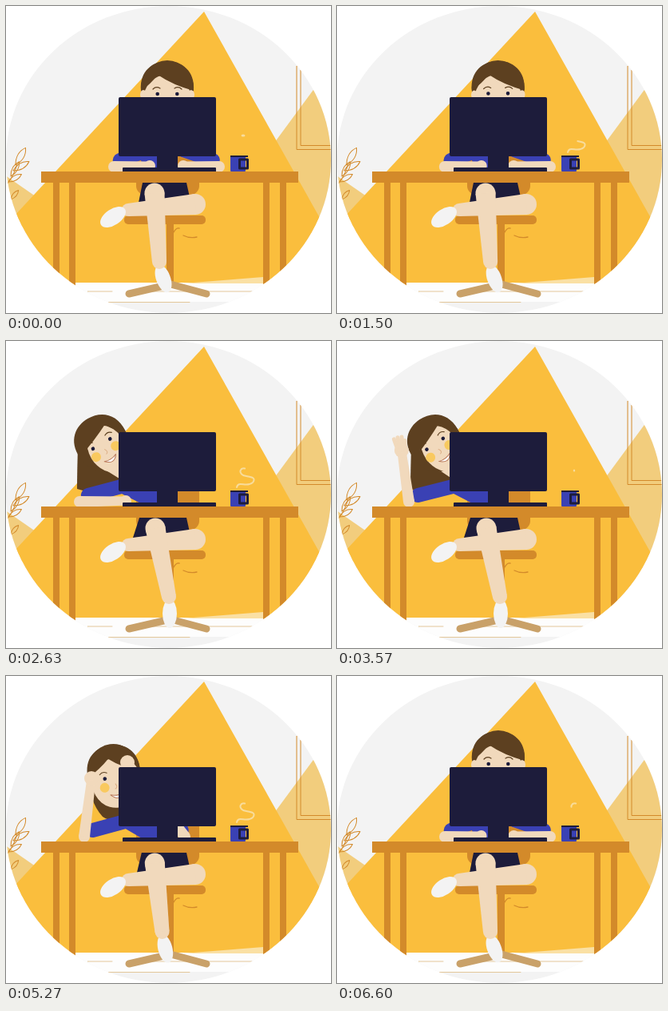
Animation of 407 by 384 pixels, one loop 6630 ms. Source, as an HTML page with a canvas:

```html
<!DOCTYPE html>
<html lang="en">
<head>
<meta charset="utf-8">
<title>At the desk</title>
<style>
html, body { margin: 0; width: 100%; height: 100%; overflow: hidden; background: #fff; }
canvas { display: block; }
</style>
</head>
<body>
<canvas id="stage" width="407" height="384"></canvas>
<script>
const c = document.getElementById('stage').getContext('2d');
const LOOP = 6630, STEAM = LOOP / 2;
const NAVY = '#1d1c3b', BLUE = '#3a41b4', SKIN = '#f1d9bc', HAIR = '#5d4020',
      GOLD = '#fabe3d', WOOD = '#d38a2a', PALE = '#f2cd7d', WALL = '#f3f3f3',
      RULE = '#e3c79a', STEAM_COLOR = '#f8dc9b';

// Each pose gives the head, the elbows on the desk and the hands.
const typing = { x: 202, y: 103, tilt: 0, lift: 0, open: 0,
  elbow: 135, handX: 180, handY: 200, elbowR: 267, handRX: 222, handRY: 200 };
const lookUp = { ...typing, x: 198, y: 102, tilt: -5, lift: 1, elbow: 132 };
const lean = { ...lookUp, x: 121, y: 129, tilt: -30, elbow: 92, handX: 150,
  elbowR: 202, handRX: 200, handRY: 170 };
const wave = { ...lean, x: 124, y: 129, tilt: -34, open: 1, elbow: 90, handX: 81, handY: 137 };
const fixHair = { ...typing, x: 135, y: 120, tilt: -8, elbow: 98, handX: 106, handY: 128,
  elbowR: 224, handRX: 153, handRY: 108 };

// [start of move, end of move, pose reached]
const moves = [[1400, 2050, lookUp], [2200, 2580, lean], [3370, 3570, wave],
  [4950, 5240, fixHair], [5290, 5630, typing]];

const clamp = v => Math.min(1, Math.max(0, v));
const mix = (a, b, u) => a + (b - a) * u;

function poseAt(t) {
  const pose = { ...typing };
  for (const [from, to, goal] of moves) {
    const u = clamp((t - from) / (to - from)), ease = u * u * (3 - 2 * u);
    for (const k in pose) pose[k] = mix(pose[k], goal[k], ease);
  }
  return pose;
}

function trace(p) {
  c.beginPath();
  for (let i = 0; i < p.length; i += 2) c.lineTo(p[i], p[i + 1]);
}
function poly(color, ...p) {
  c.fillStyle = color;
  trace(p);
  c.fill();
}
function line(color, width, ...p) {
  c.strokeStyle = color;
  c.lineWidth = width;
  trace(p);
  c.stroke();
}
function box(color, x, y, w, h, r = 0) {
  c.fillStyle = color;
  c.beginPath();
  c.roundRect(x, y, w, h, r);
  c.fill();
}
function oval(color, x, y, rx, ry = rx, deg = 0) {
  c.fillStyle = color;
  c.beginPath();
  c.ellipse(x, y, rx, ry, deg * Math.PI / 180, 0, 7);
  c.fill();
}
function shape(d, fill, stroke, width = 1) {
  const p = new Path2D(d);
  if (fill) { c.fillStyle = fill; c.fill(p); }
  if (stroke) { c.strokeStyle = stroke; c.lineWidth = width; c.stroke(p); }
}
function limb(color, x1, y1, r1, x2, y2, r2) {
  const a = Math.atan2(y2 - y1, x2 - x1), nx = -Math.sin(a), ny = Math.cos(a);
  oval(color, x1, y1, r1);
  oval(color, x2, y2, r2);
  poly(color, x1 + nx * r1, y1 + ny * r1, x2 + nx * r2, y2 + ny * r2,
    x2 - nx * r2, y2 - ny * r2, x1 - nx * r1, y1 - ny * r1);
}
function leaf(x, y, size, deg) {
  c.save();
  c.translate(x, y);
  c.rotate(deg * Math.PI / 180);
  c.scale(size, size);
  shape('M0 0Q.55 -.32 1 0Q.55 .32 0 0', null, WOOD, 1 / size);
  c.restore();
}

function room() {
  box(WALL, 0, 0, 407, 384);
  poly(PALE, 300, 220, 387, 102, 470, 220, 470, 347, 300, 347);
  poly(PALE, -5, 209, 60, 254, -5, 290);
  poly(GOLD, 248, 7, 439, 347, -68, 347);
  box('#fdfdfd', 0, 346, 407, 24);
  poly('#fae0a4', 222, 347, 322, 339, 335, 347);
  line(RULE, 1, 102, 357, 133, 357);
  line(RULE, 1, 160, 357, 308, 357);
  line(RULE, 1, 128, 370.5, 230, 370.5);
  for (const d of [0, 5]) line(WOOD, 1, 364 + d, 75 + d, 364 + d, 179.5 - d, 407, 179.5 - d);
  shape('M2 222Q10 212 14 198M3 238Q8 247 11 262', null, WOOD);
  for (let i = 0; i < 4; i++) leaf(12 - 3 * i, 199 + 7 * i, 25 - 2 * i, i % 2 ? -30 : -60);
  for (const s of [-1, 1]) leaf(6, 250 + 8 * s, 15, 50 * s);
}

function chair() {
  box(WOOD, 163, 150, 79, 86, 11);
  box(WOOD, 148, 262, 102, 11, 5);
  box(WOOD, 201, 272, 9, 76);
  for (const x of [154, 251]) line('#c9a169', 9, 206, 348, x, 360);
  shape('M210 283Q213 277 217 278M222 287Q230 291 239 289', null, WOOD, 1.3);
}

function legs(swing) {
  poly(NAVY, 171 - 4 * swing, 221, 226, 221, 230, 239, 200, 244, 166 - 7 * swing, 246);
  limb(SKIN, 237, 248, 13, 153, 255, 8);
  oval(WALL, 134, 264, 18, 10, -34);
  oval(WALL, 197 + 8 * swing, 341, 9, 18, -20 * (1 - swing));
  limb(SKIN, 186 + swing, 234, 12.5, mix(192, 204, swing), 320, 9);
}

function head({ x, y, tilt, lift }) {
  c.save();
  c.translate(x, y);
  c.rotate(tilt * Math.PI / 180);
  oval(HAIR, 0, 0, 33, 35);
  for (const s of [-1, 1]) oval(SKIN, s * 30, 8, 4 * (1 - lift), 6 * (1 - lift));
  oval(SKIN, 2 * lift, 14 - 6 * lift, 30 - 3 * lift + tilt * .13, 31);
  const part = -12 - tilt * .9;
  c.save();
  c.translate(0, -3 * lift);
  shape(`M-33 3C-35 -22 -18 -34 0 -34C18 -34 35 -22 33 3
    Q${part / 2 + 13} -4 ${part} -17Q${part / 2 - 14} -6 -33 3`, HAIR);
  c.restore();
  c.translate(-lift, 7 - 8 * lift);
  for (const s of [-1, 1]) {
    oval('#f9c95f', s * 14, 11, 6);
    oval(NAVY, s * 12.3, 0, 2.3);
    shape(`M${s * 9} -7Q${s * 14} -10 ${s * 18} -6`, null, HAIR, 1.2);
  }
  shape('M0 8Q3 13 -1 14', null, '#dcae85');
  shape('M-8 21Q1 24 9 20Q2 31 -8 21', '#fff', '#b9795a');
  c.restore();
}

function forearm(elbow, x, y, open) {
  limb(SKIN, elbow, 201, 7, x, y, 5.5);
  oval(SKIN, x, y, 7 + clamp((190 - y) / 40) * 2);
  const a = Math.atan2(y - 201, x - elbow);
  for (let i = -1.5; i < 2; i++) {
    const b = a + i * .3, r = (i > 1 ? 13 : 17) * open;
    line(SKIN, 5, x + i * 3 * open, y, x + Math.cos(b) * r, y + Math.sin(b) * r);
  }
}

function sleeve(x, elbow) {
  line(BLUE, 18, x, 180, mix(x, elbow, .82), 193);
}

function woman(p, t) {
  const { x, y } = p, shoulder = mix(152, 178, (x - 121) / 81);
  const tap = (1 - p.lift) * Math.sin(t / 55);
  const swing = clamp(-p.tilt / 27);
  const sweep = -14 - 18 * p.lift;
  legs(swing);
  shape(`M${x - 31} ${y + 4}Q${x - 32} ${y + 36} ${x + sweep} ${y + 56}
    Q${x} ${y + 66} ${x + 28} ${y + 56}L${x + 30} ${y}`, HAIR);
  line(BLUE, 26, shoulder, 180, 184, 196);
  line(SKIN, 17, x + 8, y + 25, shoulder + 6, 172);
  sleeve(shoulder, p.elbow);
  sleeve(shoulder + 44, p.elbowR);
  head(p);
  const shake = p.open * 10 * Math.sin((t - 3570) / 85);
  forearm(p.elbow, p.handX + tap - shake, p.handY, p.open);
  forearm(p.elbowR, p.handRX - tap, p.handRY, 0);
}

function desk() {
  box(NAVY, 141, 114, 122, 74, 2);
  box(NAVY, 189, 187, 26, 17);
  box(NAVY, 146, 202, 117, 6, 1);
  for (const x of [59, 79, 322, 343]) box(WOOD, x, 220, 8, 135);
  box(WOOD, 44, 207, 322, 14);
  box(BLUE, 281, 187, 19, 20, 1);
  c.strokeStyle = NAVY;
  c.lineWidth = 3;
  c.strokeRect(292.5, 192, 10, 11);
  box(NAVY, 281, 187, 22, 2);
}

// A wisp climbs from the mug, then fades out at the top.
function steam(t) {
  const u = t % STEAM, length = 56;
  const top = clamp((u - 700) / 1200), tail = clamp((u - 2650) / 750);
  c.save();
  c.setLineDash([Math.max(.1, (top - tail) * length), 200]);
  c.lineDashOffset = -tail * length;
  if (u > 700) shape('M289 183C291 174 301 184 309 177C315 169 302 170 297 168Q291 164 295 160Q299 158 303 162',
    null, STEAM_COLOR, 2);
  c.restore();
  if (u < 400) oval(STEAM_COLOR, 297, 162, 2.5 * (1 - u / 500), 1.5);
}

function draw(now) {
  const t = now % LOOP;
  c.clearRect(0, 0, 407, 384);
  c.save();
  c.beginPath();
  c.ellipse(203.5, 192, 203.5, 192, 0, 0, 7);
  c.clip();
  c.lineCap = c.lineJoin = 'round';
  room();
  chair();
  woman(poseAt(t), t);
  desk();
  steam(t);
  c.restore();
}

const start = performance.now();
function tick() {
  draw(performance.now() - start);
  requestAnimationFrame(tick);
}
tick();
</script>
</body>
</html>
```
